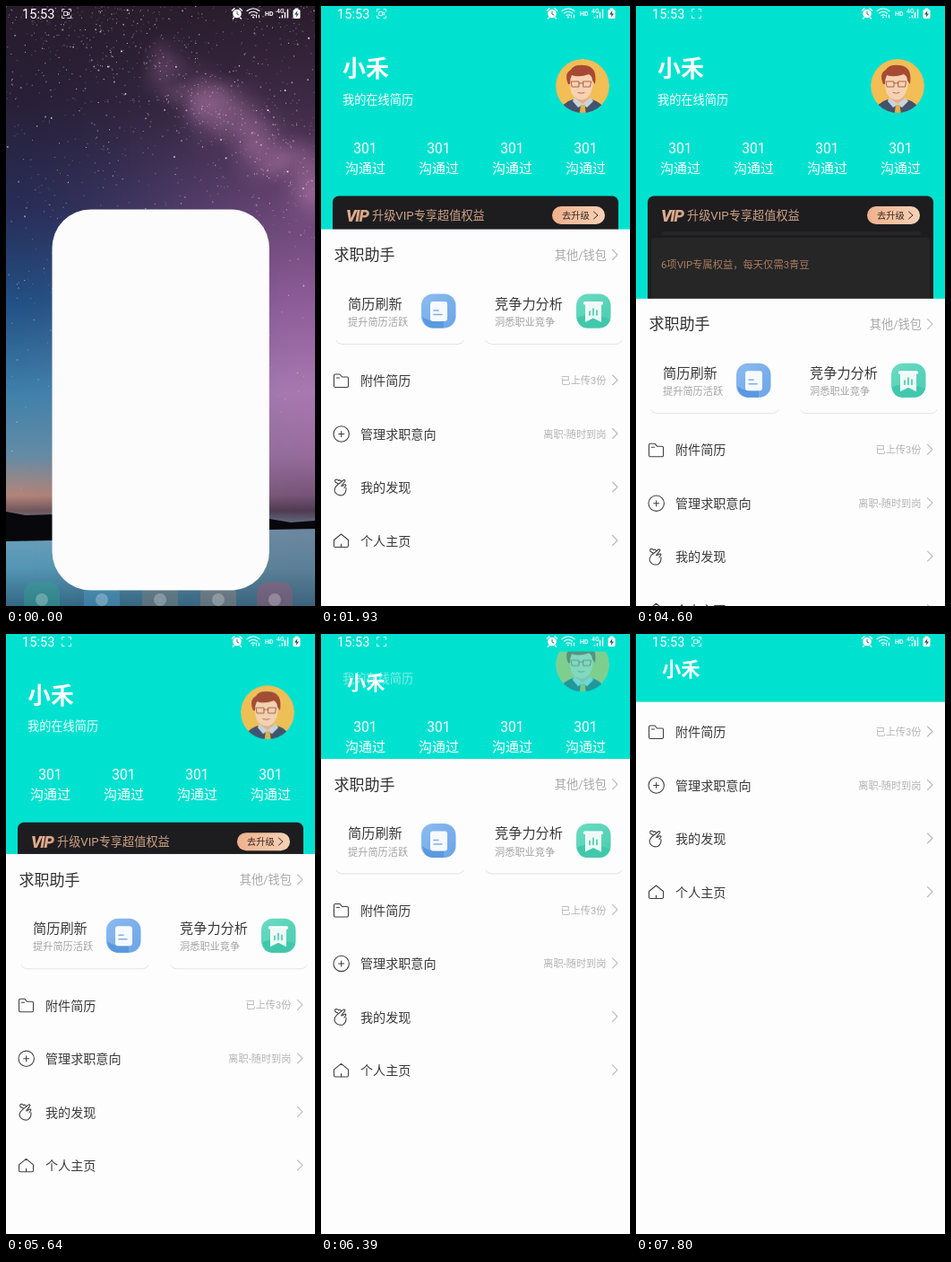
These frames come from a looping animation (345 px wide and 668 px high, 8 s). An HTML page with a canvas:

```html
<!DOCTYPE html>
<html lang="zh-CN">
<head>
<meta charset="utf-8">
<title>求职助手</title>
<style>
html, body { margin: 0; width: 100%; height: 100%; overflow: hidden; background: #fdfdfd; }
canvas, svg.stage { position: absolute; left: 0; top: 0; width: 345px; height: 668px; }
text { font-family: Roboto, "Noto Sans CJK SC", "Noto Sans CJK JP", "Noto Sans CJK", sans-serif; white-space: pre; }
</style>
</head>
<body>
<canvas id="sky" width="345" height="668"></canvas>
<svg class="stage" id="stage" viewBox="0 0 345 668" xmlns="http://www.w3.org/2000/svg"></svg>
<script>
const LOOP = 8000, W = 345, H = 668, TEAL = '#00e1d0', PAPER = '#fdfdfd';
const $ = id => document.getElementById(id);

// ---- markup helpers: y is the middle of the line of text
const text = (x, y, size, fill, str, extra = '') =>
  `<text x="${x}" y="${y + size * 0.37}" font-size="${size}" fill="${fill}" ${extra}>${str}</text>`;
const line = (d, color, width = 1.2, extra = '') =>
  `<path d="${d}" fill="none" stroke="${color}" stroke-width="${width}" stroke-linecap="round" stroke-linejoin="round" ${extra}/>`;
const shape = (d, fill) => `<path d="${d}" fill="${fill}"/>`;
const box = (x, y, w, h, r, fill, extra = '') =>
  `<rect x="${x}" y="${y}" width="${w}" height="${h}" rx="${r}" fill="${fill}" ${extra}/>`;
const grad = (id, a, b, dir = 'x2="1" y2="1"') =>
  `<linearGradient id="${id}" x1="0" y1="0" ${dir}><stop stop-color="${a}"/><stop offset="1" stop-color="${b}"/></linearGradient>`;
const chevron = y => line(`M325.5 ${y - 5.5}l5.5 5.5l-5.5 5.5`, '#b9b9b9', 1.1);
const END = 'text-anchor="end"', MID = 'text-anchor="middle"';

const avatar = `
  <g clip-path="url(#face)">
    <circle cx="292" cy="89" r="30" fill="#f2be55"/>
    ${shape('M266 122Q267 108 281 104L292 109L302 104Q316 107 318 122Z', '#43526e')}
    ${shape('M285 94H299V105L292.500 111L285 105Z', '#e5b08c')}
    ${shape('M283 102L292 109L301 102L304 106L297 113L292 110L287 113L281 106Z', '#c9d3da')}
    ${shape('M290 110H294.500L296 121H288.500Z', '#e3b04c')}
    ${shape('M278 80Q277 98 284 102Q290 106 296 103Q304 98 304 80Q299 72 288 72Q279 73 278 80Z', '#f6d2b2')}
    ${shape('M276 87Q271 75 279 71Q282 65 294 66Q309 67 306 87L303 83Q303 78 299 76Q288 80 280 77Q278 81 278 87Z', '#a64a34')}
    ${line('M279.500 84h8.500v6h-7.500zM293 84h8.500l-1 6h-7.500zM288 86h5', '#a9563a', 0.9)}
    ${line('M287 96.500q4 1.500 7 0', '#c4694e', 1)}
  </g>`;

const stats = [49, 131, 213, 295].map(x =>
  text(x + 0.5, 158, 15.6, '#fff', '301', MID) + text(x + 0.5, 180, 15, '#fff', '沟通过', MID)).join('');

const vipCard = `
  ${box(13, 211.5, 319, 150, 7, '#1d1d1f')}
  ${box(28, 251, 290, 4, 1, '#252527')}
  ${box(17, 258, 311, 110, 4, '#262626')}
  ${text(28, 233, 18, 'url(#gold)', 'VIP', 'font-weight="900" font-style="italic" letter-spacing="-1.2"')}
  ${text(57, 233, 13.2, '#cfa286', '升级VIP专享超值权益')}
  ${box(258, 223, 59, 20, 10, 'url(#pill)')}
  ${text(269, 233, 10.3, '#3a2820', '去升级')}
  ${line('M304.500 229l4.500 4l-4.500 4', '#3a2820', 1)}
  ${text(28, 288, 11.3, '#ab7b60', '6项VIP专属权益，每天仅需3青豆')}`;

// ---- white sheet, measured from its top edge
const tool = (x, title, note) => text(x, 83, 15.2, '#3a3a3a', title) + text(x, 104, 11.2, '#a3a3a3', note);
const edge = (a, b) => line(`M${a} 124.500Q${a + 2} 128.500 ${a + 8} 128.500H${b - 8}Q${b - 2} 128.500 ${b} 124.500`, '#e3e3e3', 1);
const items = [
  ['附件简历', '已上传3份', 'M14.500 163.500q0-1.500 1.500-1.500h5l2.500 3h5.500q1.500 0 1.500 1.500v8.500q0 1.500-1.500 1.500h-13q-1.500 0-1.500-1.500zM17.500 166h3'],
  ['管理求职意向', '离职-随时到岗', 'M14 228.500a8.700 8.700 0 1 0 17.400 0a8.700 8.700 0 1 0 -17.400 0M19.700 228.500h6M22.700 225.500v6'],
  ['我的发现', '', 'M18 285.500q-4 4-2.500 7.500q3 5 9 3.500q4-3 3.500-8M18 285.500l7.500-6q2 0 1 2l-4 5M19.500 284l-3.500-2q-1-2.500 1-3q2 0 2.500 1.500q1.500-1.500 3 .500M24 286.500q3-3 4-1l-2 3'],
  ['个人主页', '', 'M14.500 346.500L22.500 340L30.500 346.500V353q0 1.500-1.500 1.500H16q-1.500 0-1.500-1.500zM22.500 351v3.500']
].map(([name, note, icon], i) => {
  const y = 169 + 59.5 * i;
  return line(icon, '#404040', 1.1) + text(44, y, 14.1, '#3a3a3a', name) +
    text(318.5, y, 11.2, '#b3b3b3', note, END) + chevron(y - 0.5);
}).join('');

const sheet = `
  ${text(14.5, 29, 17, '#303030', '求职助手', 'font-weight="500"')}
  ${text(319, 29, 13.2, '#a9a9a9', '其他/钱包', END)}${chevron(29)}
  ${edge(17, 159)}${edge(184, 336)}
  ${tool(30, '简历刷新', '提升简历活跃')}${tool(194, '竞争力分析', '洞悉职业竞争')}
  ${box(112, 72.5, 38.5, 38, 13, 'url(#blue)')}
  ${shape('M113 98Q123 105 137 103V110.500H125Q115 110 113 98Z', '#5a98e0')}
  ${box(122, 81, 19, 22, 3, '#f6faff')}
  ${line('M126 91h5M126 95.500h9', '#7fb0e8', 1.6)}
  ${box(285, 72.5, 38.5, 38, 13, 'url(#green)')}
  ${shape('M286 99Q300 92 323 101Q320 110.500 310 110.500H297Q287 110 286 99Z', '#41c8ac')}
  ${box(293, 81, 22, 3.5, 1.5, '#fff')}
  ${shape('M295 83H313V104L304 99.500L295 104Z', '#eefaf6')}
  ${line('M300 92v4M304 89v7M308 91v5', '#4fccb0', 1.7)}
  ${items}`;

const status = `
  ${text(18, 9, 14.6, '#fff', '15:53')}
  ${line('M62.500 6V3.500h2.500M70 3.500h2.500V6M72.500 11v2.500h-2.500M65 13.500h-2.500V11', '#fff', 0.8)}
  <g id="rec">${line('M65 6.500h3.500v4h-3.500zM68.500 8l2-1v3l-2-1', '#fff', 0.8)}</g>
  <circle cx="258" cy="8.500" r="4.800" fill="#fff"/>
  ${line('M258 6v3l2 1', '#47716f', 1)}
  ${line('M252.500 5l2.500-2.300M263.500 5l-2.500-2.300M254.500 13l-1 1M261.500 13l1 1', '#fff', 1.5)}
  ${line('M269 5.500q7-5.500 14 0M271.500 8q4.500-3.500 9 0M274 10.500q2-1.500 4 0', '#fff', 1.2)}
  ${line('M279.500 10v3M282.500 13v-3', '#fff', 1)}
  <circle cx="276" cy="12.500" r="1" fill="#fff"/>
  ${text(289, 8.5, 7, '#fff', 'HD', 'font-weight="700"')}
  ${text(302, 5, 7, '#fff', '4G', 'font-weight="500"')}
  ${line('M305.500 12v1.500M308.500 10v3.500M311.500 7v6.500M314.500 3.500v10', '#fff', 1.4, 'style="stroke-linecap:butt"')}
  ${box(320.5, 4, 8, 10, 1.5, '#fff')}${box(322.5, 2.5, 4, 2, 0.5, '#fff')}
  ${shape('M325.500 5L322 9.500H324.500L323.500 13L327 8.500H324.800Z', '#24524f')}`;

$('stage').innerHTML = `
  <defs>
    ${grad('gold', '#e8b593', '#d09a7c')}${grad('pill', '#efb18c', '#f7d2b6', 'x2="1" y2="0"')}
    ${grad('blue', '#8dbbf0', '#6aa5e6')}${grad('green', '#6adcc3', '#4accb0')}
    <clipPath id="face"><circle cx="292" cy="89" r="30"/></clipPath>
  </defs>
  <rect id="splash" fill="#fcfcfc"/>
  <g id="app">
    ${box(0, 0, W, H, 0, TEAL)}
    <g id="head">
      <g id="fade">${avatar}${text(24, 104, 13.2, '#fff', '我的在线简历')}</g>
      ${stats}${vipCard}
    </g>
    <text id="name" fill="#fff" font-weight="700">小禾</text>
    <svg id="sheet" x="0" width="${W}" height="${H}" overflow="hidden">
      ${box(0, 0.6, W, H, 0, PAPER)}<g id="list">${sheet}</g>
    </svg>
  </g>
  <rect id="bar" width="${W}" height="19.500" fill="${TEAL}"/>
  ${status}`;

// ---- night sky
function paintSky() {
  const c = $('sky').getContext('2d');
  let seed = 7;
  const rnd = () => (seed = (seed * 16807) % 2147483647) / 2147483647;
  // height, left colour, right colour
  const bands = [
    [0, [40, 28, 44], [42, 28, 44]], [110, [40, 32, 56], [62, 42, 70]],
    [230, [40, 46, 88], [106, 70, 116]], [330, [34, 80, 132], [142, 92, 152]],
    [430, [62, 128, 170], [168, 120, 176]], [500, [98, 140, 165], [150, 108, 155]],
    [545, [178, 132, 120], [118, 84, 120]], [562, [112, 86, 92], [78, 58, 80]],
    [584, [108, 160, 186], [108, 136, 160]], [625, [84, 150, 180], [92, 128, 152]],
    [668, [52, 104, 132], [58, 100, 124]]
  ];
  for (let x = 0; x < W; x++) {
    const u = x / W, k = u * u * (3 - 2 * u), g = c.createLinearGradient(0, 0, 0, H);
    for (const [y, a, b] of bands)
      g.addColorStop(y / H, `rgb(${a.map((v, i) => Math.round(v + (b[i] - v) * k))})`);
    c.fillStyle = g;
    c.fillRect(x, 0, 1, H);
  }
  // hazy galaxy band
  for (let i = 0; i < 60; i++) {
    const x = 170 + rnd() * 190, y = 60 + (x - 170) * 0.8 + (rnd() - 0.5) * 50, r = 15 + rnd() * 25;
    const g = c.createRadialGradient(x, y, 0, x, y, r);
    g.addColorStop(0, 'rgba(190,130,180,.1)');
    g.addColorStop(1, 'rgba(190,130,180,0)');
    c.fillStyle = g;
    c.fillRect(x - r, y - r, 2 * r, 2 * r);
  }
  for (let i = 0; i < 1300; i++) {
    const x = rnd() * W, s = rnd() > 0.9 ? 1.7 : 1;
    let y = rnd() * rnd() * 540;
    if (i % 3 === 0) y = 70 + (x - 170) * 0.75 + (rnd() + rnd() - 1) * 90;
    c.fillStyle = `rgba(255,240,250,${0.2 + 0.8 * rnd() * rnd()})`;
    if (y < 540) c.fillRect(x, y, s, s);
  }
  c.fillStyle = '#08070b';
  c.beginPath();
  [[0, 563], [22, 567], [52, 566], [200, 575], [294, 571], [318, 575], [345, 573], [345, 582], [294, 583], [52, 595], [0, 596]]
    .forEach(p => c.lineTo(...p));
  c.fill();
  [[40, '#2fa58c'], [107, '#4f9fd0'], [172, '#8b7f78'], [237, '#a08478'], [300, '#b0506f']].forEach(([x, color]) => {
    c.globalAlpha = 0.4;
    c.fillStyle = color;
    c.beginPath();
    c.roundRect(x - 20, 641, 40, 40, 13);
    c.fill();
    c.globalAlpha = 0.25;
    c.fillStyle = '#fff';
    c.beginPath();
    c.arc(x, 661, 7, 0, 7);
    c.fill();
  });
  c.globalAlpha = 1;
}

// ---- motion
const linear = u => u, smooth = u => (1 - Math.cos(Math.PI * u)) / 2;
// time, top of the sheet's content, easing towards it
const scroll = [
  [0, 326], [1352, 326], [1602, 248, smooth], [3560, 248], [4180, 326, smooth],
  [4585, 326], [4835, 248, smooth], [5620, 248], [5990, 183], [6440, 133],
  [6790, 95], [7280, 12], [7800, -60], [8000, -60]
];
// scrolled distance, name's middle, left, size
const nameSteps = [[0, 69, 24, 26], [65, 59, 29, 21.3], [153, 49, 29, 21.3], [173, 39, 29, 21.3]];
const blinks = [410, 920, 1430, 1930, 3570, 3890, 4600, 5850, 6330, 6815, 7340, 7795];
const clamp = v => Math.min(1, Math.max(0, v));

function between(table, p, col, ease = linear) {
  let i = 1;
  while (i < table.length - 1 && table[i][0] < p) i++;
  const a = table[i - 1], b = table[i];
  return a[col] + (b[col] - a[col]) * ease(clamp((p - a[0]) / (b[0] - a[0])));
}
const listTop = t => {
  const next = scroll.find(k => k[0] >= t) || scroll[scroll.length - 1];
  return between(scroll, t, 1, next[2] || linear);
};
const set = (id, attrs) => { for (const k in attrs) $(id).setAttribute(k, attrs[k]); };
const show = (id, on) => { $(id).style.display = on ? '' : 'none'; };

function draw(t) {
  show('sky', t < 180);
  show('bar', t >= 180);
  show('app', t >= 560);
  show('splash', t < 560);
  show('rec', blinks.filter(b => b <= t).length % 2 === 0);

  if (t < 560) {
    const u = clamp(Math.floor(t / 60) / 3), left = (1 - u) ** 2;
    set('splash', { x: 51.5 * left, y: 226.5 * left, width: W - 102.5 * left, height: H - 244 * left, rx: 43 * left });
    return;
  }
  const list = listTop(t), top = Math.max(75, list), moved = Math.max(0, 248 - top);
  const scrim = clamp((248 - list - 155) / 25);
  set('sheet', { y: top });
  set('list', { transform: `translate(0 ${list - top})` });
  set('head', { transform: `translate(0 ${-moved / 2})`, opacity: 1 - scrim });
  set('fade', { opacity: 1 - 0.75 * moved / 173 });
  const size = between(nameSteps, moved, 3);
  set('name', { x: between(nameSteps, moved, 2), y: between(nameSteps, moved, 1) + size * 0.37, 'font-size': size });
}

paintSky();
const start = performance.now();
(function tick() {
  draw((performance.now() - start) % LOOP);
  requestAnimationFrame(tick);
})();
</script>
</body>
</html>
```
